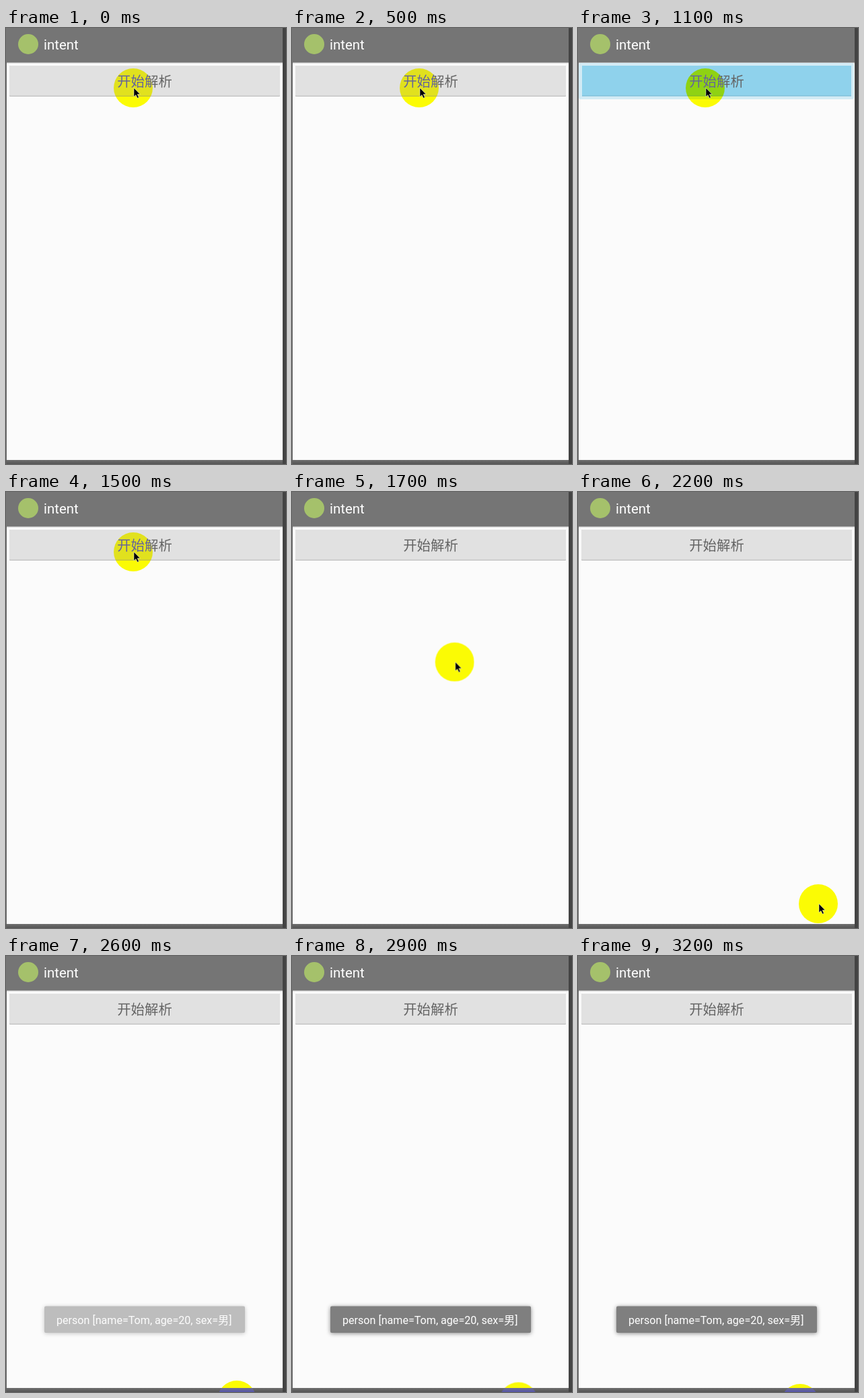
An HTML page that plays this animation: 416x648 px, repeating every 4100 ms.

```html
<!DOCTYPE html>
<html lang="zh-CN">
<head>
<meta charset="utf-8">
<title>intent</title>
<style>
  html, body { margin: 0; width: 100%; height: 100%; overflow: hidden; background: #fbfbfb; }
  svg { display: block; width: 416px; height: 648px; isolation: isolate; }
  text { font-family: Roboto, "Noto Sans CJK SC", "Noto Sans CJK", sans-serif; }

  .pointer { animation: move 4.1s infinite; }
  .halo { fill: #00f; mix-blend-mode: difference; }
  .pressed { opacity: 0; animation: press 4.1s step-end infinite; }
  .toast { opacity: 0; animation: appear 4.1s infinite; }
  .toast rect { filter: drop-shadow(0 1px 3px rgba(0, 0, 0, .45)); }

  @keyframes move {
    0% { transform: translate(189px, 89px); }
    39.02% { transform: translate(189px, 89px); animation-timing-function: steps(3); }
    46.34%, 48.78% { transform: translate(347px, 580px); animation-timing-function: steps(2); }
    53.65% { transform: translate(357px, 612px); animation-timing-function: steps(4); }
    63.41% { transform: translate(343px, 660px); animation-timing-function: steps(6); }
    78.04%, 100% { transform: translate(330px, 665px); }
  }
  @keyframes press {
    0% { opacity: 0; }
    26.82% { opacity: 1; }
    31.7% { opacity: 0; }
  }
  @keyframes appear {
    0% { opacity: 0; }
    56.09% { opacity: 0; animation-timing-function: steps(6); }
    70.73%, 100% { opacity: 1; }
  }
</style>
</head>
<body>
<svg viewBox="0 0 416 648">
  <defs>
    <linearGradient id="barShade" x2="0" y2="1">
      <stop stop-color="#707070"/>
      <stop offset="1" stop-color="#555"/>
    </linearGradient>
  </defs>

  <rect width="416" height="648" fill="#fbfbfb"/>
  <rect width="411" height="51" fill="#757575"/>
  <rect y="51" width="411" height="1" fill="#b5b5b5"/>
  <rect y="52" width="411" height="1" fill="#e6e6e6"/>
  <circle cx="33" cy="24" r="15" fill="#a5c16b"/>
  <text x="56" y="32" font-size="20.4" fill="#fff">intent</text>

  <rect x="5" y="56" width="402" height="46" rx="1" fill="#c6c6c6"/>
  <rect x="5" y="56" width="402" height="44.5" rx="1" fill="#e1e1e1"/>
  <g class="pressed">
    <rect x="1" y="52" width="409" height="54" rx="3" fill="#d3ebf5"/>
    <rect x="6" y="56" width="400" height="45" fill="#8fd2ec"/>
    <rect x="6" y="100" width="400" height="1.5" fill="#80c0da"/>
  </g>
  <text x="206" y="87" font-size="20.4" fill="#646464" text-anchor="middle">开始解析</text>

  <rect y="642" width="416" height="6" fill="url(#barShade)"/>
  <rect y="51" width="1" height="597" fill="#606060"/>
  <rect x="411" width="5" height="648" fill="#434343"/>

  <g class="toast">
    <rect x="57" y="520.5" width="298" height="39.5" rx="2" fill="#7f7f7f"/>
    <text x="75" y="547" font-size="16.1" fill="#fff">person [name=Tom, age=20, sex=男]</text>
  </g>

  <circle class="pointer halo" r="29"/>
  <path class="pointer" d="M1 0v13l3-2.6 2.2 4.8 2.2-1-2.2-4.6h4z"
        fill="#000" stroke="#fff" stroke-width=".5"/>
</svg>
</body>
</html>
```
